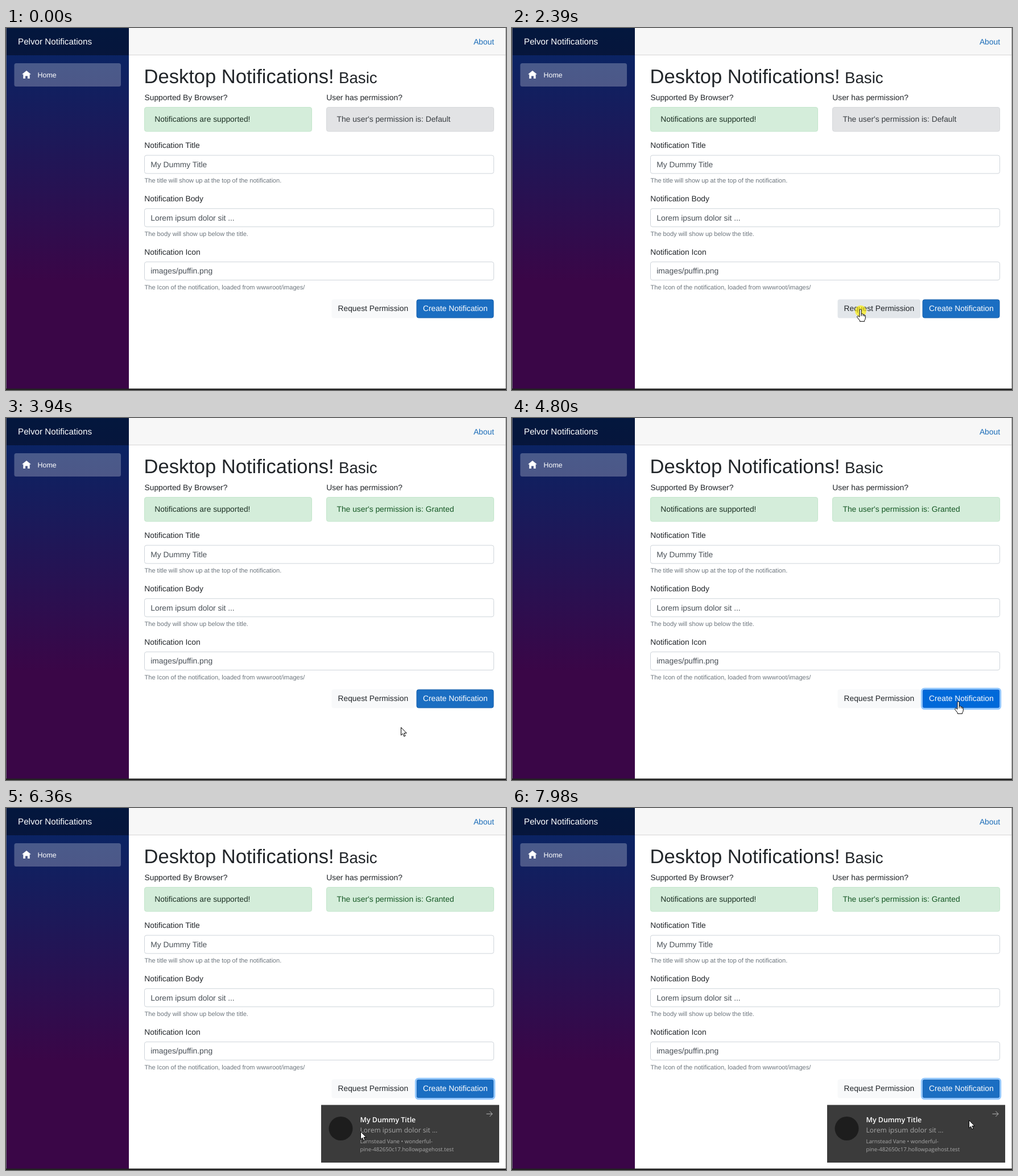
These frames come from a looping animation (879x637 px, 8 s). An HTML page:

```html
<!DOCTYPE html>
<html lang="en">
<head>
<meta charset="utf-8">
<title>Desktop Notifications</title>
<style>
  html, body { margin: 0; width: 100%; height: 100%; overflow: hidden; background: #fff; }
  svg { display: block; }
  text { font: 13.82px "Liberation Sans", Arial, sans-serif; fill: #212529; text-rendering: geometricPrecision; }
  .brand { font-size: 15.2px; fill: #fff; }
  .nav { font-size: 12.44px; fill: #fff; }
  .title { font-size: 34.56px; }
  .sub { font-size: 27.65px; }
  .value { fill: #495057; }
  .hint { font-size: 11.06px; fill: #6c757d; }
  .input { fill: #fff; stroke: #ced4da; }
  .success { fill: #d4edda; stroke: #c3e6cb; }
  .neutral { fill: #e2e3e5; stroke: #d6d8db; }
  .light { fill: #f8f9fa; }
  .light.hover { fill: #e2e6ea; }
  .primary { fill: #1b6ec2; stroke: #1861ac; }
  .primary.hover { fill: #0069d9; stroke: #0062cc; }
  .ring { fill: none; stroke-width: 3; }
  #toast text { font: 9.65px "Open Sans", "Noto Sans", sans-serif; fill: #a8a8a8; }
  #toast .head { font-size: 12.4px; font-weight: 600; fill: #fff; }
  #toast .body { font-size: 12.05px; }
  .pointer { fill: #fff; stroke: #000; stroke-linejoin: round; }
</style>
</head>
<body>
<svg width="879" height="637" viewBox="0 0 879 637">
  <defs>
    <linearGradient id="side" x1="0" y1="0" x2="0" y2="1">
      <stop offset="0" stop-color="#052767"/>
      <stop offset=".7" stop-color="#3a0647"/>
    </linearGradient>
  </defs>
  <rect width="879" height="637" fill="#fff"/>

  <!-- sidebar -->
  <rect width="216" height="635" fill="url(#side)"/>
  <rect width="216" height="48" fill="#000" fill-opacity=".4"/>
  <text class="brand" x="21" y="29">Pelvor Notifications</text>
  <rect x="14.5" y="62" width="187.5" height="41" rx="3.5" fill="#fff" fill-opacity=".25"/>
  <path d="M36 75L28 81.5H30.3V89H34V84.5H38V89H41.7V81.5H44Z" fill="#fff"/>
  <text class="nav" x="55.5" y="87">Home</text>

  <!-- top bar -->
  <rect x="216" width="663" height="47" fill="#f7f7f7"/>
  <rect x="216" y="47" width="663" height="1" fill="#d6d5d5"/>
  <text x="858" y="28.5" text-anchor="end" style="fill:#1a6cb8">About</text>

  <!-- page -->
  <text class="title" x="242.5" y="97">Desktop Notifications!</text>
  <text class="sub" x="585" y="97">Basic</text>
  <text x="243.5" y="126.5">Supported By Browser?</text>
  <text x="563.3" y="126.5">User has permission?</text>
  <rect class="success" x="243.5" y="139.5" width="294" height="42.5" rx="3.5"/>
  <text x="261.3" y="165" style="fill:#1d3024">Notifications are supported!</text>
  <rect id="status" x="563.5" y="139.5" width="294" height="42.5" rx="3.5"/>
  <text id="permission" x="581.5" y="165"></text>
  <g id="fields"></g>

  <rect id="request" class="light" x="572.5" y="477.5" width="145.5" height="33" rx="3.5"/>
  <rect id="requestRing" class="ring" x="571" y="476" width="148.5" height="36" rx="5" stroke="#ebecee"/>
  <text x="583.5" y="498.3">Request Permission</text>
  <rect id="create" class="primary" x="722" y="478" width="135" height="32" rx="3.2"/>
  <rect id="createRing" class="ring" x="720.3" y="476.2" width="138.4" height="35.6" rx="5" stroke="#92c7ff"/>
  <text x="733" y="498.3" style="fill:#fff">Create Notification</text>

  <!-- window edges -->
  <rect width="1" height="637" fill="#70707a"/>
  <rect x="878" width="1" height="637" fill="#a4a4a4"/>
  <rect y="634.5" width="879" height="2.5" fill="#222"/>

  <g id="toast">
    <rect x="554" y="522.5" width="313" height="101.5" fill="#3b3b3b"/>
    <circle id="badge" cx="588.5" cy="564" r="21" fill="#1d1d1d"/>
    <text class="head" x="622.5" y="553">My Dummy Title</text>
    <text class="body" x="622.5" y="570.5">Lorem ipsum dolor sit ...</text>
    <text x="622.5" y="590">Larnstead Vane • wonderful-</text>
    <text x="622.5" y="603.5">pine-482650c17.hollowpagehost.test</text>
    <path id="dismiss" d="M844.5 538.3H855M850.3 533.6L855 538.3L850.3 543" fill="none" stroke="#b8b8b8"/>
  </g>

  <g id="cursor">
    <circle id="click" cy="1" r="10" fill="#fff000" fill-opacity=".65"/>
    <path id="arrow" class="pointer" d="M.5 .5V14.2L3.6 11.3L5.8 16.3L8 15.3L5.9 10.5H10.2Z"/>
    <g id="hand">
      <path class="pointer" d="M-2 11.5V-.5a1.6 1.6 0 0 1 3.2 0V6q2.8-.4 3.3 1.1q2-.2 2.4 1.1q1.4 0 1.4 2V13q0 3-1.7 4.7V19.3H-1.6V17.8L-5.9 12.4q-1-2.2.6-2.7q1.5-.2 3.3 1.8z"/>
      <path d="M1.2 6V10M4.3 7.2V10M6.6 8.4V10.5" stroke="#000" fill="none"/>
    </g>
  </g>
</svg>
<script>
const LOOP = 8000;
const $ = id => document.getElementById(id);
const show = (id, on) => $(id).setAttribute('visibility', on ? 'inherit' : 'hidden');

const fields = [
  ['Notification Title', 'My Dummy Title', 'The title will show up at the top of the notification.'],
  ['Notification Body', 'Lorem ipsum dolor sit ...', 'The body will show up below the title.'],
  ['Notification Icon', 'images/puffin.png', 'The Icon of the notification, loaded from wwwroot/images/']
];
$('fields').innerHTML = fields.map(([label, value, hint], i) => `
  <g transform="translate(0 ${i * 93.8})">
    <text x="243.3" y="211">${label}</text>
    <rect class="input" x="243.5" y="224" width="614" height="32" rx="3.5"/>
    <text class="value" x="254.3" y="244.8">${value}</text>
    <text class="hint" x="243.5" y="272">${hint}</text>
  </g>`).join('');

// Pointer moves: first step, last step, step count, end x, end y
const moves = [
  [380, 380, 1, 701, 624],
  [457, 690, 4, 493, 541],
  [840, 840, 1, 492, 541],
  [1450, 1450, 1, 509, 540],
  [1528, 1760, 4, 613, 497],
  [3090, 3400, 5, 561, 540],
  [3470, 3880, 6, 640, 549],
  [3940, 3940, 1, 694, 544],
  [4018, 4330, 5, 785, 501],
  [5960, 6360, 6, 623, 569],
  [6820, 6970, 3, 785, 607],
  [7350, 7600, 4, 534, 590],
  [7670, 7980, 5, 803, 549]
];

function pointerAt(t) {
  let x = 712, y = 640;
  for (const [from, to, steps, endX, endY] of moves) {
    if (t < from) break;
    const gap = (to - from) / Math.max(1, steps - 1);
    const step = t >= to ? steps : Math.floor((t - from) / gap) + 1;
    const left = 1 - step / steps;
    const eased = 1 - left * left;
    x += (endX - x) * eased;
    y += (endY - y) * eased;
  }
  return [x, y];
}

const during = (t, from, to) => t >= from && t < to;

function draw(t) {
  const [x, y] = pointerAt(t);
  const inside = (x0, y0, x1, y1) => x >= x0 && x <= x1 && y >= y0 && y <= y1;
  const onRequest = inside(572, 477, 718, 511);
  const onCreate = inside(721, 477, 858, 511);
  const granted = t >= 2460;
  const toast = t >= 5100;
  const hand = (onRequest || onCreate) && !toast;

  $('status').setAttribute('class', granted ? 'success' : 'neutral');
  $('permission').textContent = "The user's permission is: " + (granted ? 'Granted' : 'Default');
  $('permission').style.fill = granted ? '#155724' : '#383d41';

  $('request').classList.toggle('hover', onRequest);
  $('create').classList.toggle('hover', onCreate && t < 5180);
  show('requestRing', during(t, 2460, 3740));
  show('createRing', t >= 4710);

  show('toast', toast);
  show('badge', t >= 5180);
  show('dismiss', t >= 5960 && inside(554, 523, 867, 624));

  $('cursor').setAttribute('transform', `translate(${Math.round(x)} ${Math.round(y)})`);
  show('cursor', t >= 380);
  show('hand', hand);
  show('arrow', !hand);
  show('click', during(t, 2390, 2460) || during(t, 3740, 3810) || during(t, 4710, 4800));
}

function tick() {
  draw((performance.now() - start) % LOOP);
  requestAnimationFrame(tick);
}
const start = performance.now();
tick();
</script>
</body>
</html>
```
